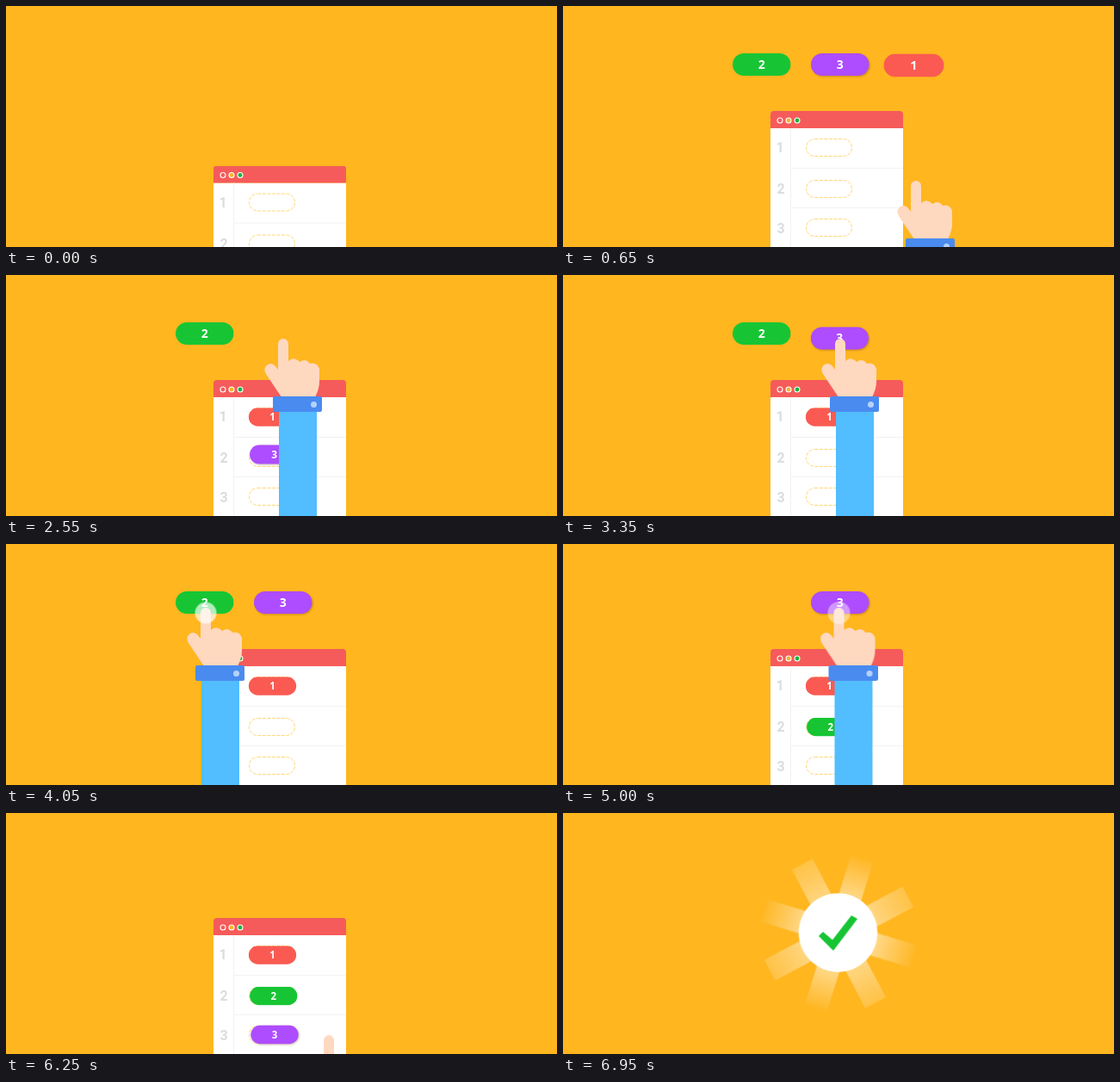
Recreate the animation shown at these times as an HTML page. Size 640 by 280 pixels, loop 7 s.

```html
<!DOCTYPE html>
<html lang="en">
<head>
<meta charset="utf-8">
<title>Sorting pills</title>
<style>
  html, body { margin: 0; width: 100%; height: 100%; overflow: hidden; background: #ffb61f; }
  svg { display: block; width: 640px; height: 280px; }
  text { text-anchor: middle; font-weight: 700; }

  .move { animation: 7s ease-in-out infinite; }
  .leave { animation-name: leave; }
  .window { animation-name: rise; }
  .one { animation-name: one; }
  .two { animation-name: two; }
  .three { animation-name: three; }
  .hand { animation-name: hand; }
  .tap { animation-name: tap; }
  .badge { animation-name: badge; }
  .burst { animation-name: burst; }
  .spin { animation-name: spin; animation-timing-function: linear; }

  .pill rect { x: -33.75px; y: -13px; width: 67.5px; height: 26px; rx: 13px; }
  .pill text { font-family: "Noto Sans", "Open Sans", sans-serif; font-size: 14px; fill: #fff; }
  .three rect { filter: drop-shadow(1px 1px 1px rgba(120, 70, 20, .4)); }
  .rows text { font-family: Roboto, Inter, sans-serif; font-size: 16px; fill: #dcdce0; }
  .rows path { stroke: #f2f2f2; }
  .slots rect { width: 53px; height: 20px; rx: 10px; fill: none; stroke: #ffd877; stroke-dasharray: 4 1.5; }
  .lights circle { stroke: #fff; stroke-width: 1.1; }

  @keyframes rise {
    0% { transform: translateY(64px); animation-timing-function: ease-out; }
    3.57%, 100% { transform: none; }
  }
  @keyframes leave {
    0%, 90.71% { transform: none; animation-timing-function: ease-in; }
    93.57%, 100% { transform: translateY(180px); }
  }
  @keyframes one {
    0%, 6.43% { transform: translate(407.5px, 69px) scale(0); }
    8.29% { transform: translate(407.5px, 69px) scale(1.2); }
    9.71%, 21.43% { transform: translate(407.5px, 69px) scale(1); }
    26.43%, 100% { transform: translate(309.5px, 165px) scale(.82); }
  }
  @keyframes two {
    0%, 3.57% { transform: translate(230.75px, 68px) scale(0); }
    5.43% { transform: translate(230.75px, 68px) scale(1.2); }
    6.86%, 59.29% { transform: translate(230.75px, 68px) scale(1); }
    63.57%, 100% { transform: translate(310.75px, 212.5px) scale(.82); }
  }
  @keyframes three {
    0%, 5% { transform: translate(321.75px, 68px) scale(0); }
    6.86% { transform: translate(321.75px, 68px) scale(1.2); }
    8.29%, 32.57% { transform: translate(321.75px, 68px) scale(1); }
    36.4%, 43.57% { transform: translate(311.75px, 208.5px) scale(.85); }
    48.57%, 72.86% { transform: translate(321.75px, 68px) scale(1); }
    77.14%, 100% { transform: translate(312px, 257.5px) scale(.82); }
  }
  @keyframes hand {
    0%, 7.86% { transform: translate(410px, 300px); animation-timing-function: ease-out; }
    12.86%, 27.14% { transform: translate(410px, 74px); }
    31.86%, 51.43% { transform: translate(322px, 74px); }
    56.43%, 63.57% { transform: translate(232px, 74px); }
    68.57%, 77.86% { transform: translate(320.5px, 74px); }
    85.71% { transform: translate(369px, 238px); animation-timing-function: linear; }
    89.29% { transform: translate(375px, 258px); animation-timing-function: linear; }
    91.43%, 100% { transform: translate(381px, 300px); }
  }
  @keyframes tap {
    0%, 19.29%, 31.43%, 56.43%, 70% { opacity: 0; transform: translateY(6px) scale(.5); }
    20.71%, 32.29%, 71.43% { opacity: .42; transform: translateY(6px) scale(1); }
    57.86% { opacity: .68; transform: translateY(6px) scale(.96); }
    22.86%, 34.29%, 60%, 73.57%, 100% { opacity: 0; transform: translateY(6px) scale(1.1); }
  }
  @keyframes badge {
    0%, 92.86% { transform: translate(319.5px, 139px) scale(0); }
    94.57% { transform: translate(319.5px, 139px) scale(1.1); }
    95.71%, 100% { transform: translate(319.5px, 139px) scale(1); }
  }
  @keyframes burst {
    0%, 93.71% { transform: translate(320.5px, 140px) scale(0); }
    96.43%, 100% { transform: translate(320.5px, 140px) scale(1); }
  }
  @keyframes spin {
    from { transform: rotate(1deg); }
    to { transform: rotate(561deg); }
  }
</style>
</head>
<body>
<svg viewBox="0 0 640 280">
  <defs>
    <linearGradient id="soft" x1="0" y1="1" x2="0" y2="0">
      <stop offset=".1" stop-color="#fff" stop-opacity=".45"/>
      <stop offset="1" stop-color="#fff" stop-opacity=".04"/>
    </linearGradient>
    <linearGradient id="firm" x1="0" y1="1" x2="0" y2="0">
      <stop offset=".1" stop-color="#fff" stop-opacity=".42"/>
      <stop offset="1" stop-color="#fff" stop-opacity=".17"/>
    </linearGradient>
    <g id="rays">
      <rect x="-13.5" y="-90" width="27" height="50" fill="url(#soft)"/>
      <rect x="-13.5" y="-91" width="27" height="51" fill="url(#firm)" transform="rotate(45)"/>
    </g>
  </defs>

  <rect width="640" height="280" fill="#ffb61f"/>

  <g class="move leave">
    <g class="move window">
      <path d="M241 142h154v220h-154z" fill="#fff"/>
      <path d="M241 142v-16q0-4 4-4h146q4 0 4 4v16z" fill="#f55b5a"/>
      <g class="lights">
        <circle cx="252" cy="133" r="3" fill="#f55b5a"/>
        <circle cx="262" cy="133" r="3" fill="#f5b52a"/>
        <circle cx="272" cy="133" r="3" fill="#18b53a"/>
      </g>
      <g class="rows">
        <path d="M264.5 142v220M265 188.5h130M265 234.5h130"/>
        <text x="252" y="170">1</text>
        <text x="253" y="218">2</text>
        <text x="253" y="264">3</text>
      </g>
      <g class="slots">
        <rect x="282.5" y="154.5"/>
        <rect x="282.5" y="202.5"/>
        <rect x="282.5" y="247.5"/>
      </g>
    </g>
    <g class="pill move one"><rect fill="#fa5a52"/><text y="5">1</text></g>
    <g class="pill move two"><rect fill="#17c534"/><text y="5">2</text></g>
    <g class="pill move three"><rect fill="#ae4cff"/><text y="5">3</text></g>
  </g>

  <g class="move hand">
    <path d="M-5 84h44v300h-44z" fill="#52bdff"/>
    <path d="M-6 6a6 6 0 0 1 12 0V26q6-6 13 1q7-5 12 2q8-2 11 6V50q0 8-5 18H-2L-20 41q-4-7 2-11q5-3 9 2L-6 36Z" fill="#ffd8c0"/>
    <rect x="-12" y="67" width="57" height="18" rx="2" fill="#4a8bf0"/>
    <circle cx="35.5" cy="76.5" r="3.5" fill="#b5d2fb"/>
    <circle class="move tap" r="13" fill="#fff"/>
  </g>

  <g class="move burst">
    <g class="move spin">
      <use href="#rays"/>
      <use href="#rays" transform="rotate(90)"/>
      <use href="#rays" transform="rotate(180)"/>
      <use href="#rays" transform="rotate(270)"/>
    </g>
  </g>
  <g class="move badge">
    <circle r="45.7" fill="#fff"/>
    <path d="M-22.5 4l5-5 11 9.500 22-28.500 7 4-28 37z" fill="#17c534"/>
  </g>
</svg>
</body>
</html>
```
